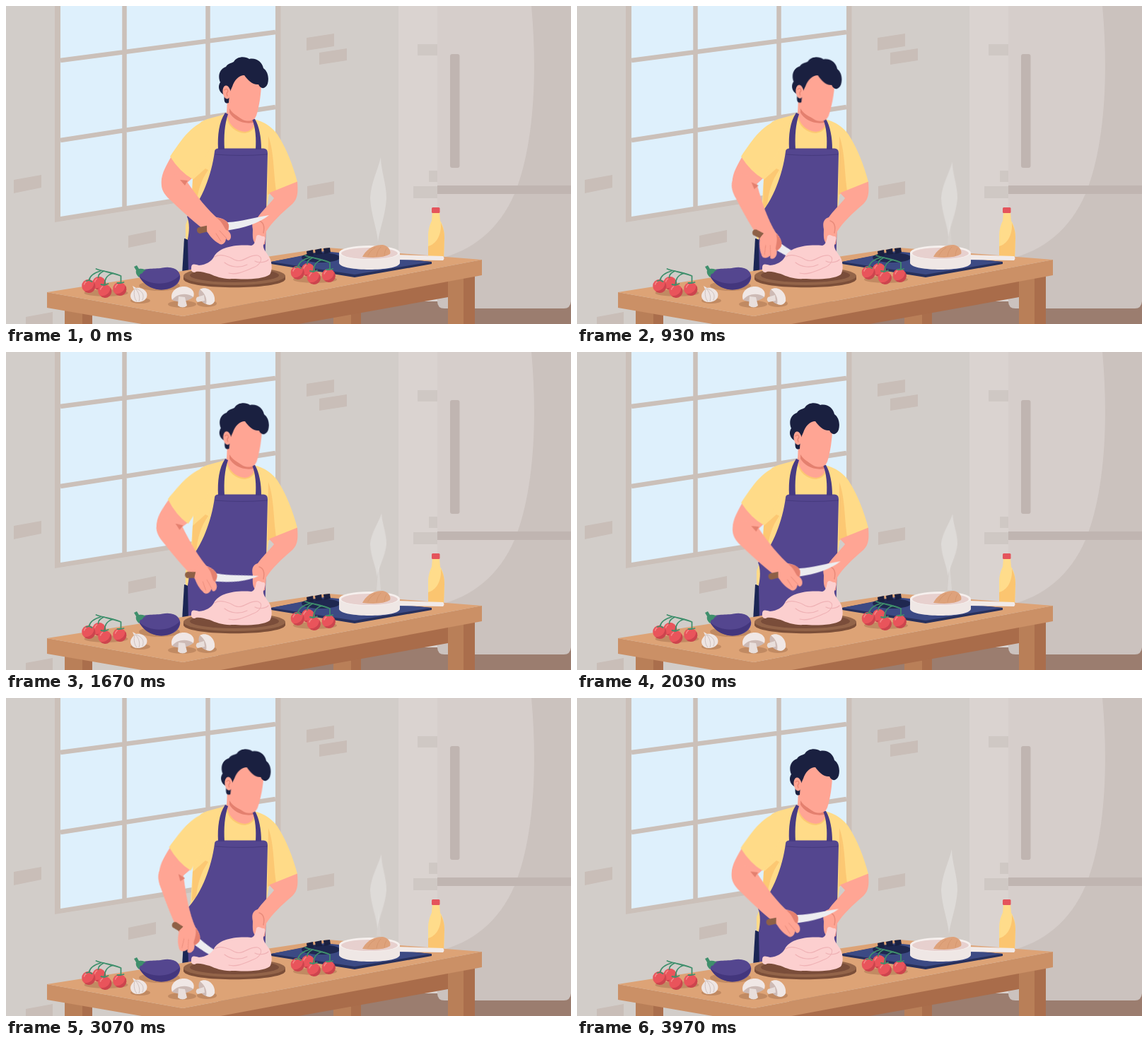
Animation, 799 px wide and 450 px high, one loop 4030 ms. Source, as an HTML page:

```html
<!DOCTYPE html>
<html lang="en">
<head>
<meta charset="utf-8">
<title>Cooking</title>
<style>
html, body { margin: 0; height: 100%; overflow: hidden; background: #d2cdc9; }
svg { display: block; width: 100vw; height: 100vh; }

.skin { fill: #ffa594; }
.skin-dark { fill: #e4806f; }
.shirt { fill: #ffdb88; }
.shirt-dark { fill: #fcc873; }
.apron { fill: #54468f; }
.hair { fill: #1a2040; }
.brick { fill: #c9beb8; }
.line { fill: none; stroke-linecap: round; stroke-linejoin: round; }

.upper, .fore, .hand, .head { animation: 2015ms infinite; }
.upper { transform-origin: 280px 178px; animation-name: upper; }
.fore { transform-origin: 236px 250px; animation-name: fore; }
.hand { transform-origin: 294px 308px; animation-name: hand; }
.head { transform-origin: 334px 200px; animation-name: head; animation-timing-function: ease-in-out; }
.steam { transform-origin: 526px 271px; animation: steam 4030ms ease-in-out infinite; }
.wisp { animation: wisp 4030ms ease-in-out infinite; }

@keyframes upper {
  0% { transform: rotate(0deg); animation-timing-function: cubic-bezier(.33,.23,.6,1); }
  26% { transform: rotate(-14deg); animation-timing-function: cubic-bezier(.4,0,.6,.78); }
  46% { transform: rotate(0deg); animation-timing-function: cubic-bezier(.3,.3,.6,1); }
  72% { transform: rotate(7.5deg); animation-timing-function: cubic-bezier(.4,.1,.7,.7); }
  100% { transform: rotate(0deg); }
}
@keyframes fore {
  0% { transform: rotate(0deg); animation-timing-function: cubic-bezier(.33,.2,.6,1); }
  26% { transform: rotate(9deg); animation-timing-function: cubic-bezier(.5,0,.75,.5); }
  46% { transform: rotate(18.5deg); animation-timing-function: cubic-bezier(.3,.3,.6,1); }
  52.4% { transform: rotate(24.5deg); animation-timing-function: cubic-bezier(.4,0,.65,.85); }
  68% { transform: rotate(5.7deg); animation-timing-function: cubic-bezier(.3,.3,.6,.9); }
  100% { transform: rotate(0deg); }
}
@keyframes hand {
  0% { transform: translate(0px,0px) rotate(0deg); animation-timing-function: cubic-bezier(.33,.2,.6,1); }
  26% { transform: translate(3.5px,3.5px) rotate(9.5deg); animation-timing-function: cubic-bezier(.4,0,.6,1); }
  46% { transform: translate(2px,2px) rotate(21deg); animation-timing-function: linear; }
  52.4% { transform: translate(2px,2px) rotate(18.4deg); animation-timing-function: ease-in-out; }
  68% { transform: translate(0px,0px) rotate(11.3deg); animation-timing-function: cubic-bezier(.3,.3,.65,.85); }
  100% { transform: translate(0px,0px) rotate(0deg); }
}
@keyframes head {
  0%, 100% { transform: rotate(0deg); }
  50% { transform: rotate(2.1deg); }
}
@keyframes steam {
  0%, 100% { transform: skewX(0deg) scaleY(1); }
  50% { transform: skewX(-2deg) scaleY(.74); }
}
@keyframes wisp {
  0%, 100% { opacity: 0; }
  50% { opacity: .2; }
}
</style>
</head>
<body>
<svg viewBox="0 0 799 450" preserveAspectRatio="none">
  <defs>
    <g id="tomato">
      <circle r="9.300" fill="#e9545b"/>
      <path d="M8 -5A9.300 9.300 0 0 1 -6 7.200C2 8 8 3 8 -5Z" fill="#cc444d"/>
      <path class="line" d="M-6 -2Q-5 -5 -3 -6" stroke="#f48a89" stroke-width="1.500"/>
    </g>
    <g id="vine">
      <ellipse cx="20" cy="34" rx="31" ry="5" fill="#c18a62"/>
      <use href="#tomato" x="10" y="20"/>
      <use href="#tomato" x="-5" y="24"/>
      <use href="#tomato" x="39" y="28"/>
      <use href="#tomato" x="18" y="31"/>
      <path class="line" d="M6 0C16 4 30 5 41 10L41 19M30 6C20 9 18 15 18 22M17 3C10 6 9 9 9 12M12 3C2 6 -3 10 -4 16M13 22L18 23L23 21M36 20L41 20L45 19M-8 17L-4 16L0 18" stroke="#3f8f6c" stroke-width="1.800"/>
    </g>
  </defs>

  <!-- Room -->
  <path d="M0 0H799V450H0Z" fill="#d2cdc9"/>
  <path d="M555 0H799V450H555Z" fill="#dad3d0"/>
  <path d="M300 418H799V450H300Z" fill="#9b7d6f"/>
  <g class="brick">
    <path d="M11 246L50 239V257L11 265ZM173 325L212 317V334L173 342ZM28 440L66 433V450H28Z"/>
    <path d="M425 45L464 39V57L425 63ZM443 66L482 60V77L443 83ZM426 255L464 248V266L426 273Z"/>
    <path d="M582 54H610V70H582ZM598 233H610V249H598ZM576 255H610V272H576Z" fill="#cfc8c4"/>
  </g>

  <!-- Window -->
  <path d="M69 0H388.500V255L69 306Z" fill="#cbc0b9"/>
  <path d="M77 0H381V249L77 298Z" fill="#def0fc"/>
  <path d="M167.500 0V290M285.500 0V270M77 77L381 37M77 190L381 143" fill="none" stroke="#cbc0b9" stroke-width="6.500"/>

  <!-- Fridge -->
  <path d="M610 0H799V418Q798 428 789 428H620Q610 428 610 418Z" fill="#cbc2be"/>
  <path d="M610 0H743C752 100 746 200 719 266C698 315 660 347 610 358Z" fill="#d6cecb"/>
  <path d="M610 254H799V266H610Z" fill="#c0b5b1"/>
  <rect x="628" y="68" width="13.500" height="161" rx="3" fill="#c0b5b1"/>

  <!-- Cook -->
  <path d="M252 329L262 331V380H249Z" fill="#1b2655"/>
  <path class="shirt" d="M312 152C299 157 286 158 276 164C264 174 268 210 264 245L261 290L254 310L254 329L262 334L300 340H360L372 265L412 249C406 226 397 202 384 182C377 172 366 164 351 160Z"/>
  <path class="shirt-dark" d="M282 230L264 246L263 287L269 281C271 262 276 246 286 232ZM371 184C379 205 378 235 382 262L370 267Z"/>
  <path class="skin" d="M313 130L312 153C314 168 325 178 338 179C347 178 353 171 352 160L340 140Z"/>
  <path class="line" d="M312 156C315 170 325 178 338 179C346 178 351 173 352 167" stroke="#fcc873" stroke-width="2"/>
  <path class="skin-dark" d="M316 145C322 155 335 162 351 160L350 165C334 168 321 160 316 151Z"/>
  <path class="apron" d="M295 206Q295 201.500 301 201.500H364Q370 201.500 370 208L366 380H258L257 330C260 315 259 305 256 298C273 281 290 245 295 206Z"/>
  <path class="line" d="M296 210Q333 213 369 210" stroke="#463a7e" stroke-width="1"/>
  <path fill="#473b83" d="M310 151C301 164 299 183 300 203H309C308 184 309 168 314 153ZM348 160C353 172 354 188 353 203H361C361 186 358 170 352 160Z"/>

  <g class="head">
    <path class="skin" d="M314 108L335 96L361 108C361 124 358 142 354 155C351 163 343 164 335 161C325 156 317 145 313 133Z"/>
    <path class="hair" d="M315 137C308 140 308 131 309 126C301 122 299 114 303 108C299 99 302 89 311 86C313 82 318 81 322 79C327 71 338 71 344 75C354 73 362 79 364 88C371 93 372 103 370 110C367 118 360 118 357 111C349 112 342 105 337 98C329 98 323 105 320 114L316 123Z"/>
    <ellipse class="skin" cx="312" cy="122" rx="5.500" ry="9.500" transform="rotate(-8 312 122)"/>
    <path class="line" d="M309 119Q313 115 314 121Q311 123 313 127" stroke="#e4806f" stroke-width="1.200"/>
  </g>

  <!-- Steadying arm -->
  <path class="skin" d="M372 264.500L412 248.500C413 264 413 273 404 281C390 293 376 306 368 319L366 337L357 340C354 337 353 338 351 334C348 329 349 322 349 316C347 307 349 301 356 299C362 290 372 281 379 272Z"/>
  <path class="line" d="M358 304C364 306 366 312 364 321" stroke="#e98b7a" stroke-width="1.500"/>

  <!-- Cutting arm -->
  <g class="upper">
    <path class="skin" d="M236 209C227 225 218 239 220 253C223 267 241 267 251 255L264 243Z"/>
    <g class="fore">
      <path class="skin" d="M220 251C219 261 226 269 234 276C250 292 270 309 286 321C294 327 308 312 301 302C286 290 269 268 255 247C245 235 223 236 220 251Z"/>
      <path class="skin-dark" d="M246 246L257 247L253 254Z"/>
      <g class="hand">
        <path d="M273 313L302 307V315L274 322Q270 321 270 317Q270 314 273 313Z" fill="#8e6046"/>
        <path d="M308 308L314 306C333 305 352 299 372 296C358 307 338 314 311 318Z" fill="#ededf0"/>
        <path class="skin" d="M284 302C292 297 304 299 311 304C316 308 316 314 314 318C319 322 319 329 316 331C313 333 312 330 311 329C311 335 305 340 301 336C294 332 288 326 284 318Z"/>
        <path class="skin-dark" d="M298 300C307 300 315 305 315 311L314 318C308 317 309 308 298 300Z"/>
        <path class="line" d="M302 318L312 329M297 322L304 333" stroke="#e98b7a" stroke-width="1"/>
      </g>
    </g>
    <path class="shirt" d="M292 160C264 164 249 188 232 213Q246 235 264 245L282 212L293 190Z"/>
  </g>

  <!-- Table -->
  <path d="M83 425H108V450H83ZM463 415H488V450H463ZM625 383H647V450H625Z" fill="#b97f58"/>
  <path d="M108 425H122V450H108ZM488 410H502V450H488ZM647 380H663V450H647Z" fill="#aa6e4c"/>
  <path d="M250 455L625 386V412L386 455Z" fill="#a96c4a"/>
  <path d="M58 405L250 439L673 359V381L250 460L58 427Z" fill="#cb9066"/>
  <path d="M58 405L249 375L375 354L455 342L673 359L250 439Z" fill="#dda376"/>

  <!-- Hob -->
  <path d="M375 362L450 348L602 362V365L493 384L375 365Z" fill="#27305c"/>
  <path d="M375 362L450 347L602 362L493 380Z" fill="#3c4a84"/>
  <ellipse cx="445" cy="356" rx="27" ry="7" fill="#1f2850"/>
  <path d="M425 347L434 345L435 353L426 354ZM437 345L446 343L447 351L438 352ZM449 343L458 342L459 349L450 351Z" fill="#1a2040"/>

  <!-- Bottle -->
  <path d="M603 292H613L614 304C618 310 620 318 620 328L619 357Q608 361 597 357V326C597 317 599 310 602 304Z" fill="#ffdc8b"/>
  <path d="M615 307C619 315 620 321 620 328L619 357Q608 361 597 357V340C608 337 616 325 615 307Z" fill="#fbc570"/>
  <rect x="602" y="285" width="11.500" height="8" rx="1.500" fill="#e4545c"/>

  <!-- Pan -->
  <path d="M552 352L618 354Q621 357 618 360L552 359Z" fill="#f1eae8"/>
  <path d="M471 349V364C474 376 554 376 557 364V349Z" fill="#efe7e5"/>
  <ellipse cx="514" cy="349" rx="43" ry="10" fill="#f6f0ee"/>
  <ellipse cx="514" cy="350" rx="40" ry="8" fill="#e7d0ce"/>
  <path d="M504 355C508 346 519 337 533 338C541 339 545 347 543 351Q532 358 504 355Z" fill="#dea27b"/>
  <path class="line" d="M512 353Q515 346 522 342M524 354Q525 346 530 341M535 353Q535 348 538 343" stroke="#d4956d" stroke-width=".8"/>
  <g fill="#fff">
    <path class="wisp" d="M527 300L530 337H524Z"/>
    <path class="steam" opacity=".28" d="M530 214C530 232 538 252 538 272C537 295 528 316 526 334C525 316 516 295 515 272C516 250 526 232 530 214Z"/>
  </g>

  <!-- Board and bird -->
  <path d="M251 382V387C258 402 388 402 395 387V382Z" fill="#7c4f39"/>
  <ellipse cx="323" cy="382" rx="72" ry="13" fill="#936449"/>
  <ellipse cx="323" cy="381" rx="63" ry="10" fill="#7a4d3a"/>
  <path d="M262 371C262 363 268 366 273 367C283 366 290 362 294 355C300 343 320 337 347 339C352 338 353 331 354 326C357 321 361 327 365 326C368 329 365 333 364 338C363 343 367 347 370 352C377 360 377 374 373 380C363 387 338 387 321 386C308 387 297 383 288 379C280 377 270 374 267 377Q261 377 262 371Z" fill="#fccfcf"/>
  <path class="line" d="M295 355C303 350 315 354 323 359C336 365 342 351 356 353C365 356 360 366 350 370C338 375 327 381 315 378M309 363C318 370 331 371 341 366M352 361C357 364 367 363 371 359" stroke="#efb2b5" stroke-width="1.200"/>

  <!-- Vegetables -->
  <use href="#vine" x="121.500" y="372"/>
  <use href="#vine" x="417" y="353"/>
  <ellipse cx="217" cy="396" rx="29" ry="7" fill="#c18a62"/>
  <path d="M186 379C194 369 208 373 221 370.500C240 367 248 377 246 386C243 400 221 405 207 399C198 396 190 387 186 379Z" fill="#54468f"/>
  <path d="M188 382C203 396 230 397 246 381C246 397 224 406 207 399C198 396 192 389 188 382Z" fill="#43367d"/>
  <path d="M181 369L185 367L188 372C193 371 196 373 198 374C192 375 195 379 190 379L188 384C185 381 183 378 184 374Z" fill="#3f8f6c"/>

  <ellipse cx="190" cy="417" rx="14" ry="4" fill="#c18a62"/>
  <path d="M179 396L184 399C192 397 202 404 199 412C196 420 181 422 177 414C174 408 179 403 181 401Z" fill="#eee5e3"/>
  <path class="line" d="M182 400C180 408 182 415 185 418M183 400C188 405 190 412 188 418M184 400C193 403 196 409 193 416" stroke="#cfc1be" stroke-width="1"/>

  <ellipse cx="249" cy="422" rx="20" ry="5" fill="#c18a62"/>
  <ellipse cx="284" cy="421" rx="14" ry="5" fill="#c18a62"/>
  <path d="M235 416C231 405 241 396 253 397C262 398 268 404 265 412C257 409 244 410 235 416Z" fill="#f0e7e5"/>
  <path d="M235 416C241 407 256 405 265 412C256 419 244 420 235 416Z" fill="#cdbab5"/>
  <path d="M244 411L253 412L256 424Q250 429 243 424Z" fill="#e8dedb"/>
  <path d="M274 401C285 395 297 406 295 418C292 424 286 424 282 421C283 412 280 406 274 401Z" fill="#f0e7e5"/>
  <path d="M274 401C270 408 274 419 283 422C285 413 280 405 274 401Z" fill="#cdbab5"/>
  <path d="M280 409L270 412Q267 416 271 419L281 417Z" fill="#e8dedb"/>
</svg>
</body>
</html>
```
